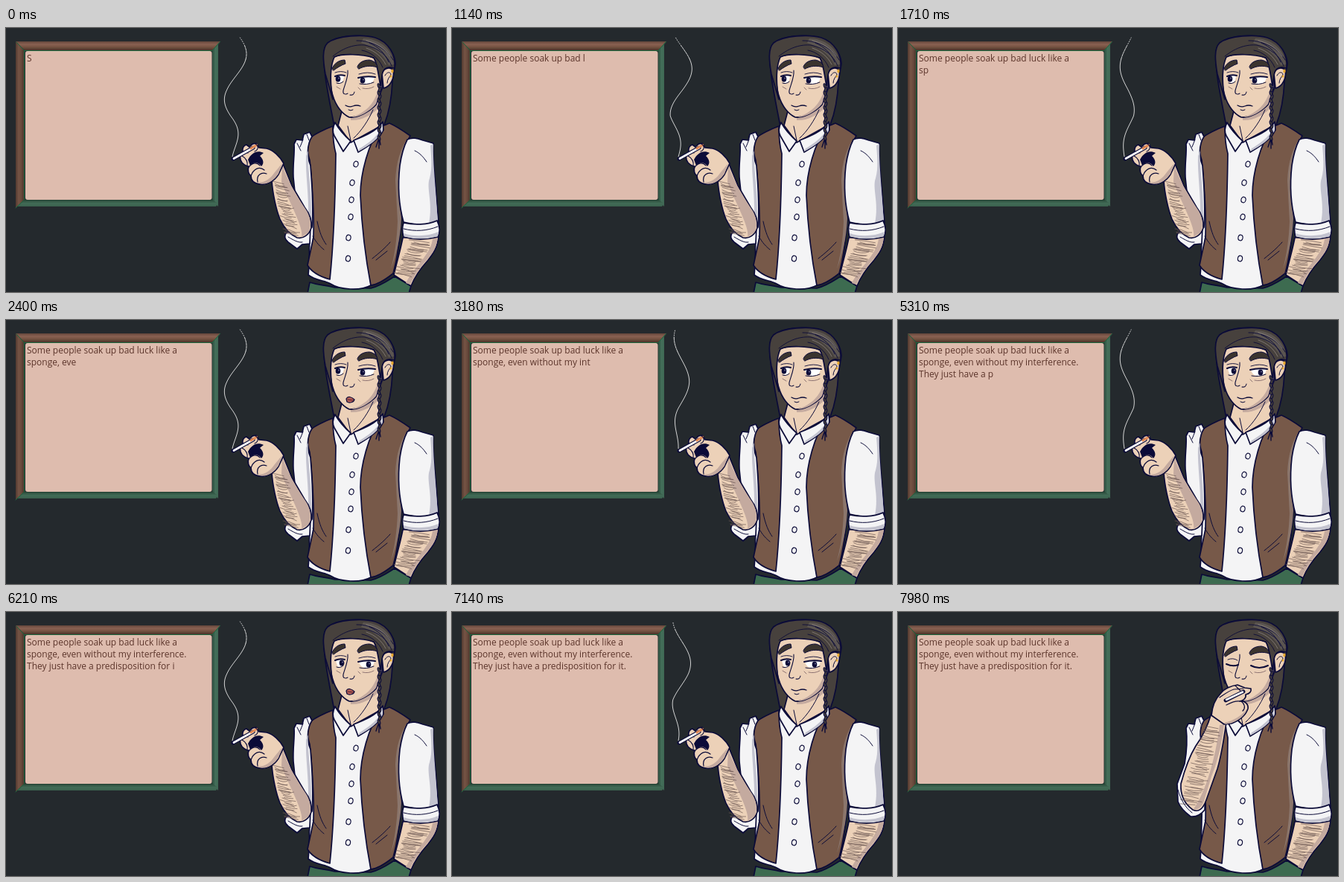
Animation, 591 px wide and 355 px high, one loop 8 s. Source, as an HTML page with a canvas:

```html
<!DOCTYPE html>
<html lang="en">
<head>
<meta charset="utf-8">
<title>Bad luck</title>
<style>
html, body { margin: 0; width: 100%; height: 100%; overflow: hidden; background: #24292d; }
canvas { display: block; width: 591px; height: 355px; }
</style>
</head>
<body>
<canvas id="stage" width="591" height="355"></canvas>
<script>
const ctx = document.getElementById('stage').getContext('2d');
const LOOP = 8000;

const INK = '#0b0b38', SKIN = '#ecd1b8', SKIN_DARK = '#c4aa9f', HAIR = '#47413d', BROW = '#3b342f',
  SHIRT = '#f4f4f5', SHIRT_DARK = '#c3c3cf', VEST = '#775949', VEST_DARK = '#8b766c', GREEN = '#3d6b50';

const SPEECH = 'Some people soak up bad luck like a\nsponge, even without my interference.\n' +
  'They just have a predisposition for it.';

// [time, letters shown]
const TYPING = [[0, 1], [30, 2], [810, 18], [1140, 25], [1620, 35], [1650, 37], [1950, 43],
  [2205, 44], [2250, 45], [3030, 59], [3090, 61], [3600, 73], [4485, 74], [4530, 75],
  [5310, 92], [6180, 111], [6270, 113]];

// Start times of the smoke's eight-step wave
const PUFFS = [-30, 1200, 2400, 3630, 4860, 6120, 7290];
const LOOK_UP = 4530, DRAG = 7980;

function lettersAt(t) {
  let i = 0;
  while (i < TYPING.length - 1 && TYPING[i + 1][0] <= t) i++;
  const [t0, n0] = TYPING[i], [t1, n1] = TYPING[i + 1] || [t0 + 1, n0];
  return Math.floor(n0 + (n1 - n0) * Math.min(1, (t - t0) / (t1 - t0)) + 1e-6);
}

function fill(d, color) {
  ctx.fillStyle = color;
  ctx.fill(new Path2D(d));
}

function line(d, width = 1.2, color = INK) {
  ctx.strokeStyle = color;
  ctx.lineWidth = width;
  ctx.stroke(new Path2D(d));
}

function part(d, color, width = 1.7) {
  fill(d, color);
  line(d, width);
}

function oval(x, y, rx, ry, color, width = 0, turn = 0) {
  ctx.beginPath();
  ctx.ellipse(x, y, rx, ry, turn, 0, 7);
  ctx.fillStyle = color;
  ctx.fill();
  if (width) {
    ctx.strokeStyle = INK;
    ctx.lineWidth = width;
    ctx.stroke();
  }
}

function ramp(x0, y0, x1, y1, ...colors) {
  const g = ctx.createLinearGradient(x0, y0, x1, y1);
  colors.forEach((c, i) => g.addColorStop(i / (colors.length - 1), c));
  return g;
}

// Scribbled arm hair along a line
function armHair(x0, y0, x1, y1, width, count) {
  let seed = 7;
  const rnd = () => (seed = seed * 16807 % 2147483647) / 2147483647;
  let d = '';
  for (let i = 0; i < count; i++) {
    const k = i / (count - 1);
    const x = x0 + (x1 - x0) * k + (rnd() - 0.5) * 6;
    const y = y0 + (y1 - y0) * k;
    const w = width * (0.5 + rnd() * 0.5);
    d += `M${x - w / 2} ${y - 2 + rnd() * 3}q${w / 2} ${rnd() * 5} ${w} ${1 + rnd() * 4}`;
  }
  line(d, 0.7, '#6b5752');
}

function drawPanel() {
  fill('M13 18H288L277 30H25Z', ramp(0, 18, 0, 30, '#64463b', '#8a6152', '#72503f', '#49322a'));
  fill('M13 18L25 30V231L13 242Z', ramp(13, 0, 25, 0, '#523a30', '#765445', '#66483b', '#412e27'));
  fill('M288 18L277 30V232L285 240V22Z', ramp(277, 0, 286, 0, '#2c4d3e', '#446f5a', '#3d6552'));
  fill('M13 242L25 231H277L285 236L282 240H15Z', ramp(0, 231, 0, 241, '#294838', '#426c57', '#385d4a'));
  line('M13 242L24.5 231V30.5L14 19M24.5 30.5H277L287.5 18.5', 1, '#1d6a40');
  line('M277 231H25', 1, '#213d30');
  ctx.beginPath();
  ctx.roundRect(26, 31, 250.5, 200, 3);
  ctx.fillStyle = '#debcae';
  ctx.fill();
}

function drawSpeech(text) {
  ctx.font = '12px "Open Sans", "Noto Sans", sans-serif';
  ctx.fillStyle = '#5c352b';
  text.split('\n').forEach((row, i) => ctx.fillText(row, 28, 45 + 16 * i));
}

function drawSmoke(t) {
  const start = PUFFS.filter(p => p <= t).pop();
  const step = Math.min(7, Math.floor((t - start) / 150));
  const size = 12 + 2.5 * Math.cos(step * Math.PI / 4);
  const at = y => {
    const rise = 173 - y;
    const swing = size * Math.min(1, rise / 55);
    return 304 + 4.5 * Math.min(1, rise / 90) + swing * Math.cos((y - 35 + 14.3 * step) * Math.PI / 60);
  };
  const trail = (from, to, dash) => {
    ctx.setLineDash(dash);
    ctx.beginPath();
    for (let y = from; y >= to; y--) ctx.lineTo(at(y), y);
    ctx.strokeStyle = '#d2d3d3';
    ctx.lineWidth = 1;
    ctx.stroke();
  };
  trail(173, 42, []);
  trail(42, 24, [3, 1]);
  trail(24, 13, [1, 2]);
  ctx.setLineDash([]);
}

function drawBody() {
  part('M441 132C437 112 432 86 429 66C427 48 424 28 432 20C445 11 468 8 490 12C510 17 522 32 523 48C522 56 520 62 519 72C518 95 514 115 508 130L500 137H447Z', HAIR);
  part('M405 357L408 342C420 346 432 346 442 349L490 350C505 346 515 338 522 334L544 347L541 357Z', GREEN);
  part('M441 131L411 150L407 320L406 332C416 340 428 339 436 344C448 352 476 354 490 346L482 230L505 132Z', SHIRT);
  part('M452 108L446 131L463 154L501 133V95Z', SKIN);
  fill('M463 121C478 120 493 110 501 98L500 108C490 118 476 125 463 124Z', SKIN_DARK);
  line('M493 110C487 124 477 139 467 148M459 132L463 151', 1);

  part('M439 132C428 136 414 143 410 147C404 154 404 166 408 178C411 205 414 250 413 281L405 319C411 329 424 335 435 338C439 300 442 250 443 169C440 158 439 142 439 132Z', VEST);
  part('M503 133L515 128C524 132 536 140 543 145C533 160 529 178 527 203L531 255C529 285 525 312 520 330C510 338 500 345 490 346C484 315 478 270 476 225C476 195 487 155 503 133Z', VEST);
  fill('M541 146C530 161 524 180 523 205L526 260C525 285 522 305 517 324C523 308 530 285 531 256L527 203C529 178 533 160 541 146Z', VEST_DARK);
  line('M418 260C421 275 425 284 430 291M412 280C417 289 422 294 427 298M516 288C509 296 502 302 492 310M512 300L497 312', 1);

  [[470, 183], [465, 208], [464, 231], [463, 254], [460, 282], [459.5, 310]]
    .forEach(([x, y]) => oval(x, y, 3.1, 3.9, SHIRT, 1.1, 0.2));

  part('M442 127C439 133 438 139 441 145L453 166L463 152C455 145 447 136 442 127Z', SHIRT);
  part('M506 126C498 139 480 146 467 151L473 167C485 160 500 151 507 137Z', SHIRT);
  fill('M505 134C497 148 485 156 475 162L473 166C488 158 500 150 506 138Z', SHIRT_DARK);
}

function drawPocketArm() {
  part('M539 150C546 146 554 149 560 151L574 155C573 162 574 172 575 190L581 262C565 266 548 264 534 261C528 240 526 212 529 185C531 171 534 160 539 150Z', SHIRT);
  fill('M570 158L574 156C573 180 578 222 580 261L568 263C574 235 564 215 569 202C573 188 571 172 570 158Z', SHIRT_DARK);
  line('M549 165C556 168 561 174 565 180', 1);
  part('M533 282L581 279C580 295 574 303 567 312C557 323 549 334 544 347L521 332C525 314 530 298 533 282Z', SKIN);
  fill('M573 282L580 280C579 295 573 303 565 312C555 323 548 334 543 345L537 343C546 324 573 302 573 282Z', SKIN_DARK);
  armHair(558, 286, 533, 332, 28, 28);
  part('M534 262C548 265 566 265 579 259C583 267 583 275 580 281C565 285 548 285 534 281C532 274 532 268 534 262Z', SHIRT);
  fill('M534 276C549 281 567 280 581 274L580 280C565 284 548 284 535 280Z', SHIRT_DARK);
  line('M534 270C550 274 565 273 580 267', 1);
}

function drawEye(x, y, w, h, pupil) {
  fill(`M${x} ${y}H${x + w}Q${x + w - 1} ${y + h} ${x + w / 2} ${y + h}Q${x + 1} ${y + h} ${x} ${y}Z`, '#fff');
  oval(pupil, y + 4.5, 3.3, 3.9, INK);
  oval(pupil + 1, y + 3.5, 0.9, 1, '#747396');
  line(`M${x - 1} ${y + 1}Q${x + w / 2} ${y - 2} ${x + w + 1} ${y}`, 2);
  line(`M${x + 1} ${y + h}Q${x + w / 2} ${y + h + 2} ${x + w - 1} ${y + h - 2}`, 1);
}

function drawHead(pose) {
  part('M505 61C508 53 517 52 520 57C522 66 517 79 507 81Z', SKIN);
  line('M509 64C512 58 517 59 517 63C515 66 512 69 512 74', 1);
  part('M438 40C435 60 435 80 439 91C443 105 452 116 461 120C472 121 488 113 497 103L505 82V50C495 34 460 30 438 40Z', SKIN);
  fill('M504 82L497 102C488 113 474 120 464 120C480 115 496 104 501 78Z', SKIN_DARK);

  part('M429 62C426 45 424 28 432 20C445 10 480 8 496 13C514 19 524 36 522 54L517 53C510 52 506 56 505 64L503 78C500 62 499 48 494 40C478 35 452 34 441 39C437 48 435 62 437 82L439 96Z', HAIR);
  fill('M480 14C500 14 519 27 521 49L514 50C509 38 494 25 477 20Z', '#5b5551');
  line('M439 38C455 25 470 22 482 23C501 27 513 38 518 51M471 17C492 17 511 28 520 43M478 30C490 32 501 41 506 53M488 20C500 25 509 34 514 46', 0.9);
  line('M484 17C498 20 508 27 516 38M484 27C496 31 505 39 510 49', 0.7, '#958d87');
  oval(519, 58, 1.7, 2.4, '#e5a72d');
  oval(517, 65, 1.4, 1.7, '#e5a72d');

  ctx.save();
  ctx.translate(0, pose.drag ? 3 : 0);
  part('M438 55C440 48 447 43 455 43L456 48C450 50 444 54 440 57Z', BROW, 1);
  part('M472 52C474 46 481 43 488 43C494 44 498 47 499 53C490 50 481 51 474 55Z', BROW, 1);
  ctx.restore();

  if (pose.drag) {
    line('M441 70Q450 74 457 71M474 72Q485 78 497 72', 2);
    line('M443 64Q450 61 456 65M476 65Q486 61 495 66', 0.9);
  } else {
    drawEye(443, 64, 11, 10, pose.lookUp ? 451 : 446);
    drawEye(474, 66, 21, 9, pose.lookUp ? 487 : 479);
    line('M442 60Q450 57 457 60M474 62Q486 58 496 62', 0.9);
  }
  line('M444 79L449 82M479 81Q487 83 494 79M473 80L476 83', 0.8, '#775c61');
  line('M459 57C460 66 455 76 453 84C452 89 456 90 459 88M462 90Q467 91 468 86', 1.1);

  if (pose.open) {
    part('M457 106C459 102 464 103 468 107C467 111 461 112 458 110Z', '#b75e55', 1.2);
    line('M459 107L466 108', 1, '#4b1f32');
  } else if (!pose.drag) {
    line('M456 104Q461 107 466 105T476 105', 1.3);
    line('M460 110Q463 112 466 110', 1);
  }

  for (let y = 78; y < 151; y += 5) {
    oval(501.5 + (y % 2 ? 0.5 : -0.5), y, 1.6, 3.4, HAIR, 1.1, y % 2 ? 0.35 : -0.35);
  }
  line('M500 151L497 160M501 151V162M502 151L503 157', 1.4);
}

function drawRestingArm() {
  part('M411 146L408 140L400 143L398 151L390 150L387 156C388 170 385 182 386 201L390 240L411 268C413 245 411 210 409 185C404 173 404 157 411 146Z', SHIRT);
  fill('M406 165C404 180 411 218 410 262L406 254C407 225 402 195 403 172Z', SHIRT_DARK);
  line('M399 150L395 160M404 143L407 151M391 155L396 165', 1);
  part('M377 275C373 279 374 284 379 288L391 297L398 291L408 290L409 266Z', SHIRT);
  part('M357 205C358 222 363 245 368 257C374 270 382 278 391 282C399 284 407 278 410 269C411 260 408 250 401 241L384 212L371 180Z', SKIN);
  fill('M371 184C379 209 393 229 404 246C410 257 410 268 406 275L397 281C400 268 382 238 370 207Z', SKIN_DARK);
  armHair(367, 207, 384, 276, 19, 32);
  line('M379 281C386 285 392 289 398 288', 1);

  part('M323 157C319 158 317 162 318 166C314 170 313 176 317 181C320 184 323 186 326 186C324 192 326 197 329 199C329 205 333 209 341 210C350 212 360 206 366 197L373 182C368 173 359 164 350 162L340 161L336 155L331 156L327 160Z', SKIN);
  fill('M338 207C346 209 355 203 361 194L371 182L366 196C359 207 346 213 338 207Z', SKIN_DARK);
  fill('M325 177C329 169 337 163 346 168L341 172C346 177 347 182 343 186C338 179 332 181 328 185Z', INK);
  line('M319 166L325 168M317 172C323 175 325 181 324 185M326 187C331 181 337 180 341 185M329 199C332 190 340 185 347 191M338 207C336 198 343 193 350 196', 1.2);
  line('M305 176L332 161', 5);
  line('M306 175.5L332 161', 2.8, '#fafafa');
  line('M329 162L336.5 157.5', 3.2, '#e48a55');
  line('M329 158C332 154 336 155 338 159M334 166C337 165 339 162 338 159', 1.2);
}

function drawRaisedArm() {
  part('M411 146L408 140L400 143L398 151L390 150L387 156C389 173 388 187 385 204L375 231L376 255C379 263 385 269 393 275C401 276 408 271 412 266L414 190C404 173 404 157 411 146Z', SHIRT);
  line('M399 150L395 160M404 143L407 151M391 155L396 165', 1);
  part('M421 136C416 153 408 169 400 180C389 198 384 216 380 231C379 247 385 258 396 266C404 270 410 264 414 253L429 211C435 191 438 169 441 148Z', SKIN);
  fill('M438 151C435 177 429 202 421 221L411 254C408 262 403 267 397 265C413 242 426 200 432 152Z', SKIN_DARK);
  armHair(421, 154, 392, 257, 25, 44);
  line('M376 239C380 253 386 263 395 270', 1);

  part('M421 139C422 128 426 117 433 110C438 103 448 99 456 98L466 102L474 103C475 107 472 110 467 111C468 116 464 119 459 120C466 119 471 124 470 130C467 139 458 146 448 150L438 151Z', SKIN);
  fill('M438 149C451 146 461 140 468 131C467 139 456 148 440 151Z', SKIN_DARK);
  line('M440 119L464 107', 4.8);
  line('M441 118L463 107.5', 2.6, '#fafafa');
  line('M432 115C438 111 444 106 451 104L464 103M459 120C452 119 447 122 441 125M461 120C466 124 467 129 463 133M453 99L460 106', 1.2);
}

function draw(t) {
  const count = lettersAt(t);
  // The mouth opens on vowels.
  const pose = {
    drag: t >= DRAG,
    lookUp: t >= LOOK_UP,
    open: 'aeiou'.includes(SPEECH[count - 1])
  };
  ctx.fillStyle = '#24292d';
  ctx.fillRect(0, 0, 591, 355);
  drawPanel();
  drawSpeech(SPEECH.slice(0, count));
  if (!pose.drag) drawSmoke(t);
  drawBody();
  drawPocketArm();
  drawHead(pose);
  if (pose.drag) drawRaisedArm();
  else drawRestingArm();
}

ctx.lineCap = ctx.lineJoin = 'round';
const begin = performance.now();
function tick() {
  draw((performance.now() - begin) % LOOP);
  requestAnimationFrame(tick);
}
tick();
</script>
</body>
</html>
```
